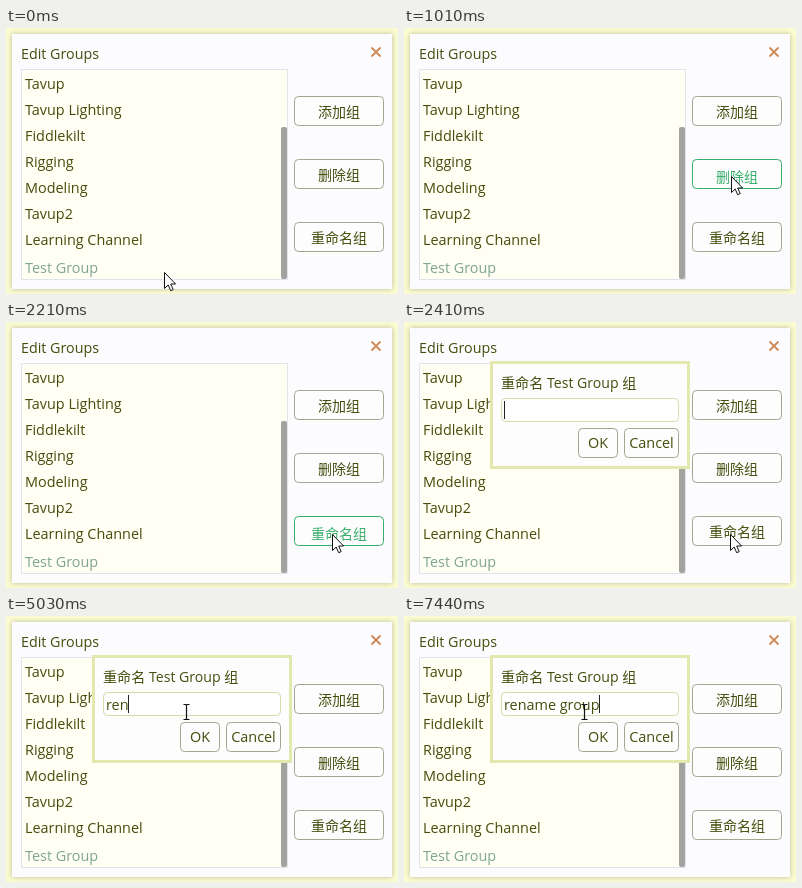
Write an HTML page with a canvas that moves like this. It is 392 px wide and 266 px high and loops after 8000 ms.

```html
<!DOCTYPE html>
<html lang="zh-CN">
<head>
<meta charset="utf-8">
<title>Edit Groups</title>
<style>
  html, body { margin: 0; width: 100%; height: 100%; overflow: hidden; background: #fcfcd2; }
  canvas { display: block; width: 392px; height: 266px; }
</style>
</head>
<body>
<canvas id="stage" width="392" height="266"></canvas>
<script>
const LOOP = 8000;
const INK = '#454d0c', GREEN = '#36ad68', EDGE = '#a3a78f';
const FONT = '"Open Sans", "Noto Sans CJK SC", "Noto Sans CJK", "Noto Sans", sans-serif';
const ctx = document.getElementById('stage').getContext('2d');

const ROWS = ['Tavup', 'Tavup Lighting', 'Fiddlekilt', 'Rigging', 'Modeling', 'Tavup2', 'Learning Channel'];
const BUTTONS = [['添加组', 68], ['删除组', 131], ['重命名组', 194]];
const DIALOG_OPENS = 2410;

// [start time, x, y] of the pointer
const POINTER = [
  [0, 158, 244], [200, 174, 238], [400, 214, 217], [600, 262, 187], [810, 306, 159],
  [1010, 327, 148], [1210, 327, 150], [1410, 326, 178], [1610, 326, 225], [1810, 326, 213],
  [2210, 326, 212], [3020, 300, 190], [3220, 244, 146], [3420, 198, 110], [3620, 180, 96]
];
// [start time, letters typed so far]
const TYPING = [
  [0, 0], [4020, 1], [4430, 2], [5030, 3], [5430, 4], [5630, 5], [6030, 6],
  [6230, 7], [6640, 8], [6840, 10], [7040, 11], [7440, 12]
];
const CARET = [[0, true], [2820, false], [3420, true], [3820, false], [4020, true]];

const valueAt = (steps, t) => steps.findLast(step => step[0] <= t).slice(1);

function text(string, x, baseline, color = INK, size = 14.4, align = 'left') {
  ctx.font = `${size}px ${FONT}`;
  ctx.textAlign = align;
  ctx.fillStyle = color;
  ctx.fillText(string, x, baseline);
}

function box(x, y, w, h, radius, fill, stroke) {
  ctx.beginPath();
  ctx.roundRect(x + .5, y + .5, w - 1, h - 1, radius);
  ctx.fillStyle = fill;
  ctx.fill();
  ctx.strokeStyle = stroke;
  ctx.lineWidth = 1;
  ctx.stroke();
}

function drawWindow() {
  ctx.fillStyle = '#fcfcd2';
  ctx.fillRect(0, 0, 392, 266);
  ctx.save();
  ctx.shadowColor = 'rgba(120, 120, 100, .5)';
  ctx.shadowBlur = 5;
  ctx.fillStyle = '#fcfcfe';
  ctx.fillRect(6, 6, 380, 255);
  ctx.restore();

  text('Edit Groups', 15, 31, INK, 14.3);
  ctx.strokeStyle = '#d08a58';
  ctx.lineWidth = 1.9;
  ctx.beginPath();
  for (const side of [-1, 1]) {
    ctx.moveTo(370 - 4.5 * side, 19.5);
    ctx.lineTo(370 + 4.5 * side, 28.5);
  }
  ctx.stroke();
}

function drawList() {
  box(15, 41, 267, 211, 0, '#fffff3', '#dfe3ee');
  ctx.fillStyle = '#a2a29f';
  ctx.beginPath();
  ctx.roundRect(275, 99, 6, 152, 2);
  ctx.fill();
  ROWS.forEach((row, i) => text(row, 19, 61 + 26 * i));
  text('Test Group', 19, 245, '#7fa58f');
}

function drawButtons(x, y, dialogOpen) {
  for (const [label, top] of BUTTONS) {
    const hover = !dialogOpen && x >= 288 && x < 378 && y >= top && y < top + 30;
    box(288, top, 90, 30, 4, '#fdfdfe', hover ? GREEN : EDGE);
    text(label, 333, top + 21 + (hover ? 2 : 0), hover ? GREEN : INK, 14, 'center');
  }
}

function drawDialog(t) {
  ctx.fillStyle = '#e3e9ae';
  ctx.fillRect(86, 39, 200, 108);
  ctx.fillStyle = '#fdfdfe';
  ctx.fillRect(89, 42, 194, 102);
  text('重命名 Test Group 组', 97, 66, INK, 14.1);
  box(97, 76, 178, 24, 4, '#fff', '#d5dbaa');
  box(174, 106, 40, 30, 4, '#fdfdfe', EDGE);
  box(220, 106, 55, 30, 4, '#fdfdfe', EDGE);
  text('OK', 194, 126, INK, 14.4, 'center');
  text('Cancel', 247.5, 126, INK, 14.4, 'center');

  const typed = 'rename group'.slice(0, valueAt(TYPING, t)[0]);
  text(typed, 100, 94);
  if (valueAt(CARET, t)[0]) {
    ctx.fillStyle = '#222';
    ctx.fillRect(Math.floor(100 + ctx.measureText(typed).width), 79, 1, 18);
  }
}

function drawPointer(x, y, overInput) {
  const shape = new Path2D(overInput
    ? 'M-3 -7.5H-1Q0 -7.5 0 -6.5Q0 -7.5 1 -7.5H3M0 -6.5V6.5M-3 7.5H-1Q0 7.5 0 6.5Q0 7.5 1 7.5H3'
    : 'M.5 .5V16.5L4.2 13L6.7 18.7L9.2 17.6L6.7 12H11.6Z');
  ctx.save();
  ctx.translate(overInput ? x + .5 : x, y);
  if (!overInput) {
    ctx.fillStyle = '#fff';
    ctx.fill(shape);
  }
  ctx.strokeStyle = '#111';
  ctx.lineWidth = overInput ? 1.2 : 1;
  ctx.stroke(shape);
  ctx.restore();
}

function draw(t) {
  const [x, y] = valueAt(POINTER, t);
  const dialogOpen = t >= DIALOG_OPENS;
  drawWindow();
  drawList();
  drawButtons(x, y, dialogOpen);
  if (dialogOpen) drawDialog(t);
  drawPointer(x, y, dialogOpen && x < 275 && y > 76 && y < 100);
}

function tick() {
  draw(performance.now() % LOOP);
  requestAnimationFrame(tick);
}
tick();
</script>
</body>
</html>
```
